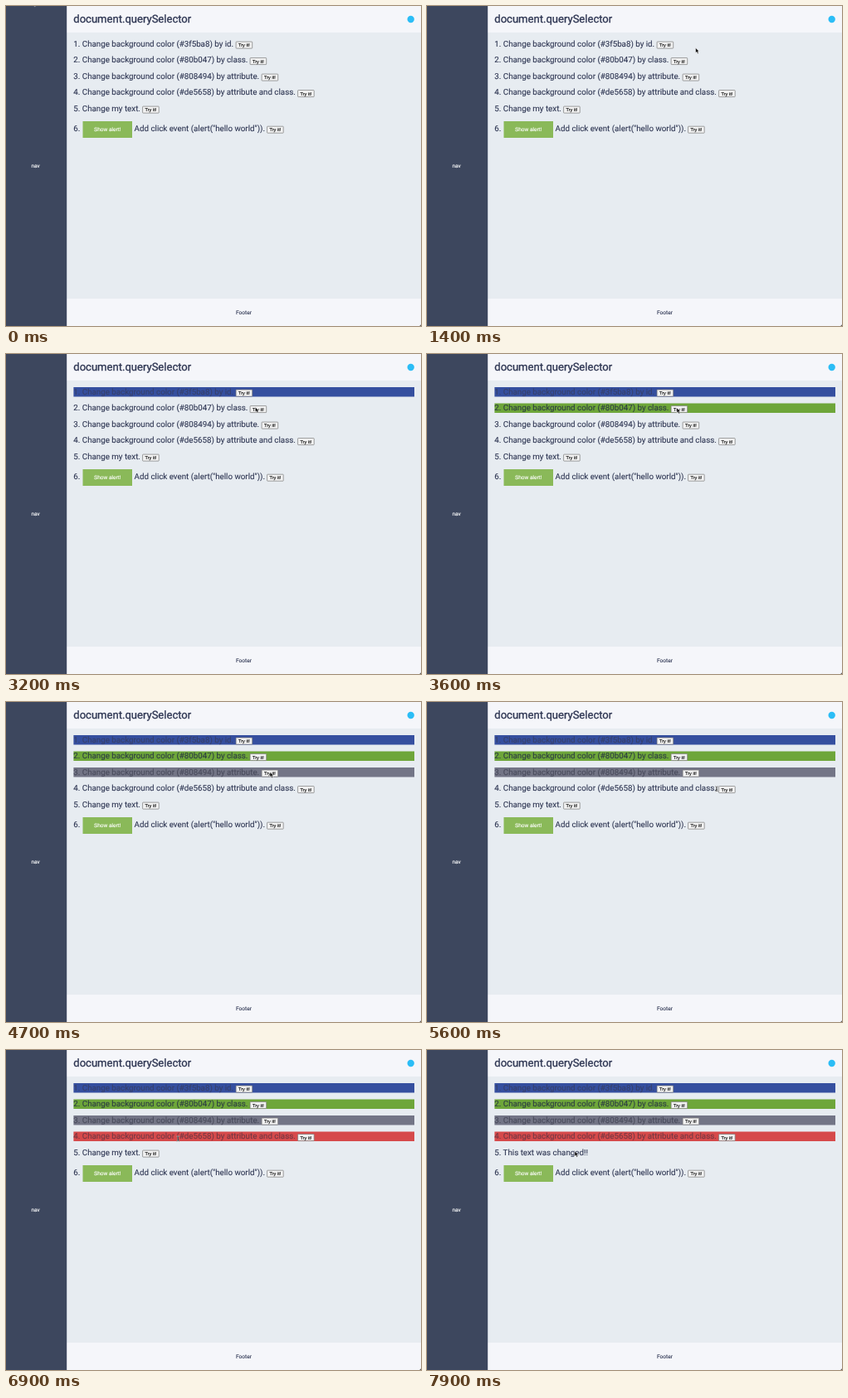
Write an HTML page that moves like this. It is 500x386 px and loops after 8 s.

```html
<!DOCTYPE html>
<html lang="en">
<head>
<meta charset="utf-8">
<title>document.querySelector</title>
<style>
  html, body { margin: 0; width: 100%; height: 100%; overflow: hidden; background: #e7ecf1; }
  svg { display: block; width: 100vw; height: 100vh; }
  text { font-family: Roboto, sans-serif; font-size: 9.78px; fill: #2b3350; stroke: #2b3350; stroke-width: .1px; text-rendering: geometricPrecision; }
  .title { font-size: 13.05px; stroke-width: .3px; }
  .small { font-size: 6.6px; }
  .try { font: 5.6px "Liberation Sans", Arial, sans-serif; fill: #111; stroke: #111; stroke-width: .15px; }
  .alert { font: 6.5px "Liberation Sans", Arial, sans-serif; }
  .white { fill: #fff; stroke: #fff; stroke-width: .15px; }
  .mid { text-anchor: middle; }
</style>
</head>
<body>
<svg viewBox="0 0 500 386" preserveAspectRatio="none">
  <rect width="500" height="386" fill="#e7ecf1"/>
  <rect x="73" width="427" height="32" fill="#f5f6fa"/>
  <rect x="73" y="353" width="427" height="33" fill="#f5f6fa"/>
  <rect width="73.2" height="386" fill="#3d475e"/>
  <path d="M500 384.2V386H498.2Z" fill="#555"/>
  <circle cx="487.7" cy="16" r="4.2" fill="#2bbdf6"/>
  <text class="title" x="81.3" y="20.2">document.querySelector</text>
  <text class="small mid white" x="35.6" y="195.1">nav</text>
  <text class="small mid" x="286.5" y="372.1">Footer</text>
  <g id="rows"></g>
  <text x="81.3" y="151.2">6.</text>
  <rect x="92.5" y="139" width="59.5" height="20" fill="#8ab959"/>
  <text class="alert mid white" x="122.2" y="151.2">Show alert!</text>
  <text x="154.6" y="151.2">Add click event (alert("hello world")).</text>
  <g id="last"></g>
  <path id="arrow" d="M0 0V5.9L1.4 4.7L2.4 7L3.6 6.5L2.6 4.3H4.3Z" fill="#000" stroke="#fff" stroke-width=".5"/>
  <g id="beam" fill="none" stroke-linecap="round"></g>
</svg>
<script>
const LOOP = 8000, STEP = 100, TOP = 40, PITCH = 19.5, BAR = 11.5;
const $ = id => document.getElementById(id);

function add(parent, tag, attrs, text = '') {
  const el = document.createElementNS('http://www.w3.org/2000/svg', tag);
  for (const key in attrs) el.setAttribute(key, attrs[key]);
  el.textContent = text;
  parent.append(el);
  return el;
}

function tryButton(parent, x, y) {
  const g = add(parent, 'g', { transform: `translate(${x} ${y})` });
  add(g, 'rect', { x: .1, y: .3, width: 19.6, height: 8, rx: .6, fill: '#f3f3f3', stroke: '#777', 'stroke-width': .7 });
  add(g, 'text', { class: 'try mid', x: 9.9, y: 6.3 }, 'Try it!');
  return g;
}

function show(el, on) {
  el.style.display = on ? '' : 'none';
}

const rows = [
  { text: '1. Change background color (#3f5ba8) by id.', button: 277, at: 2100, bar: '#354f9f', ink: '#37406a' },
  { text: '2. Change background color (#80b047) by class.', button: 294, at: 3500, bar: '#6ea63a', ink: '#2b3b42' },
  { text: '3. Change background color (#808494) by attribute.', button: 308, at: 4700, bar: '#737586', ink: '#484a5b' },
  { text: '4. Change background color (#de5658) by attribute and class.', button: 351.5, at: 6200, bar: '#d64a4b', ink: '#713844' },
  { text: '5. Change my text.', button: 164.5, at: 7600, next: '5. This text was changed!!' }
];

rows.forEach((row, i) => {
  const y = row.y = TOP + i * PITCH;
  if (row.bar) row.rect = add($('rows'), 'rect', { x: 81.4, y, width: 410.6, height: BAR, fill: row.bar });
  row.label = add($('rows'), 'text', { x: 81.3, y: y + 8.9 }, row.text);
  row.tryIt = tryButton($('rows'), row.button, y + 2.8);
});
tryButton($('last'), 314.5, 144.9);

for (const [stroke, width] of [['#fff', 1.2], ['#222', .6]]) {
  add($('beam'), 'path', { d: 'M-1.3 -3Q0 -3 0 -2V2Q0 3 -1.3 3M1.3 -3Q0 -3 0 -2V2Q0 3 1.3 3M-.7 1H.7', stroke, 'stroke-width': width });
}

// pointer moves: eased from one resting place to the next
const home = { x: 32, y: -6.3 };
const moves = [
  { from: 0, to: 500, x: 33, y: -9 },
  { from: 600, to: 1300, x: 323.6, y: 50.5 },
  { from: 1500, to: 2000, x: 285.8, y: 44.2 },
  { from: 2500, to: 3300, x: 301, y: 65 },
  { from: 3700, to: 4400, x: 318, y: 84.5 },
  { from: 5000, to: 5600, x: 349, y: 104.8 },
  { from: 5700, to: 6000, x: 361, y: 104 },
  { from: 6500, to: 6900, x: 207.3, y: 107 },
  { from: 6900, to: 7400, x: 178, y: 122.2 }
];

function pointer(t) {
  let { x, y } = home;
  for (const m of moves) {
    const k = Math.min(1, Math.max(0, (t - m.from) / (m.to - m.from)));
    const ease = k * k * (3 - 2 * k);
    x += (m.x - x) * ease;
    y += (m.y - y) * ease;
  }
  return { x, y };
}

function draw(now) {
  const t = Math.floor((now % LOOP) / STEP) * STEP;
  for (const row of rows) {
    const on = t >= row.at;
    if (row.bar) {
      show(row.rect, on);
      row.label.style.fill = row.label.style.stroke = on ? row.ink : '';
    } else {
      row.label.textContent = on ? row.next : row.text;
      show(row.tryIt, !on);
    }
  }
  const { x, y } = pointer(t);
  const overText = rows.some(r => y > r.y && y < r.y + BAR && x < r.button);
  for (const id of ['arrow', 'beam']) {
    $(id).setAttribute('transform', `translate(${x} ${y})`);
    show($(id), (id === 'beam') === overText);
  }
}

const start = performance.now();
function tick() {
  draw(performance.now() - start);
  requestAnimationFrame(tick);
}
tick();
</script>
</body>
</html>
```
